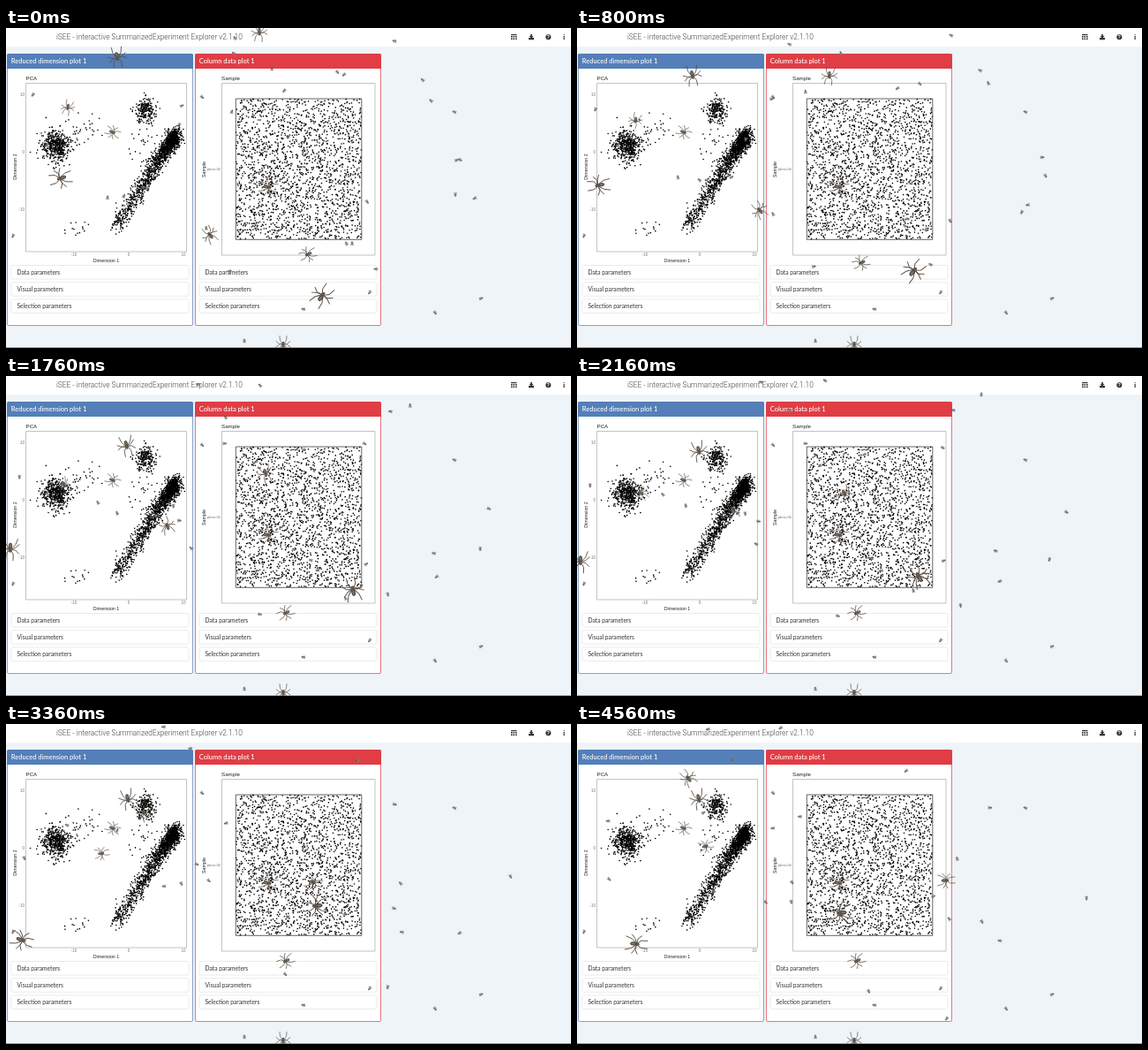
An HTML page with a canvas that plays this animation: 640x362 px, repeating every 4600 ms.

```html
<!DOCTYPE html>
<html lang="en">
<head>
<meta charset="utf-8">
<title>Bugs on a dashboard</title>
<style>
html, body { margin: 0; width: 100%; height: 100%; overflow: hidden; background: #eff4f8; }
canvas { display: block; }
</style>
</head>
<body>
<canvas id="stage" width="640" height="362"></canvas>
<script>
const LOOP = 4600, STEP = 40, WIDTH = 640, HEIGHT = 362;
const stage = document.getElementById('stage').getContext('2d');
const page = document.createElement('canvas');
page.width = WIDTH;
page.height = HEIGHT;
const bg = page.getContext('2d');

let seed = 20;
const rand = () => (seed = (seed * 16807) % 2147483647) / 2147483647;
const between = (low, high) => low + rand() * (high - low);
const gauss = () => Math.sqrt(-2 * Math.log(rand())) * Math.cos(2 * Math.PI * rand());

function box(x, y, w, h, fill, stroke, radius = 0, line = 0.7) {
  bg.beginPath();
  bg.roundRect(x, y, w, h, radius);
  if (fill) { bg.fillStyle = fill; bg.fill(); }
  if (stroke) { bg.strokeStyle = stroke; bg.lineWidth = line; bg.stroke(); }
}

function label(text, x, y, font, color, align = 'left', angle = 0) {
  bg.save();
  bg.translate(x, y);
  bg.rotate(angle);
  bg.font = font;
  bg.fillStyle = color;
  bg.textAlign = align;
  bg.fillText(text, 0, 0);
  bg.restore();
}

function dot(x, y) {
  bg.beginPath();
  bg.arc(x, y, 0.83, 0, 7);
  bg.fill();
}

function cluster(n, x, y, sx, sy) {
  for (let i = 0; i < n; i++) dot(x + gauss() * sx, y + gauss() * sy);
}

// A curved band of points, densest at its upper right end.
function strand(n) {
  for (let i = 0; i < n; i++) {
    const u = rand() ** 1.9, v = 1 - u;
    dot(191 * v * v + 344 * u * v + 124 * u * u + gauss() * 4,
        123 * v * v + 300 * u * v + 227 * u * u + gauss() * 5);
  }
}

function panel(x, title, color) {
  box(x, 30, 210, 306.5, '#fff', color, 1.5, 0.7);
  box(x - 0.5, 29, 211, 17, color, null, [1.5, 1.5, 0, 0]);
  label(title, x + 4.3, 40.2, '500 7.5px Lato, sans-serif', '#fff');
  ['Data', 'Visual', 'Selection'].forEach((name, i) => {
    const y = 268.5 + i * 19.2;
    box(x + 4.5, y, 201, 15.5, '#fff', '#e2e2e2', 1.5);
    label(name + ' parameters', x + 11, y + 10.3, '6.7px Lato, sans-serif', '#333');
  });
}

function drawIcons() {
  const ink = '#333';
  bg.fillStyle = ink;
  bg.fillRect(572, 7, 6.5, 1.2);
  for (let i = 0; i < 6; i++) bg.fillRect(572 + (i % 3) * 2.5, i < 3 ? 9 : 11.5, 1.6, 1.7);
  bg.fillRect(592, 11, 6, 2.3);
  bg.fillRect(594.2, 7, 1.7, 2.5);
  bg.beginPath();
  bg.moveTo(592.6, 9);
  bg.lineTo(597.5, 9);
  bg.lineTo(595, 11.7);
  bg.fill();
  bg.beginPath();
  bg.arc(614.3, 10.3, 3, 0, 7);
  bg.fill();
  label('?', 614.3, 12.4, 'bold 5.5px Liberation Sans, sans-serif', '#fff', 'center');
  label('i', 632, 13.4, 'bold 8px Liberation Serif, serif', ink, 'center');
}

function drawPage() {
  const sans = 'px Liberation Sans, sans-serif';
  const gray = '#777', ink = '#222', frameColor = '#aaa';
  box(0, 0, WIDTH, HEIGHT, '#eff4f8');
  box(0, 0, WIDTH, 21, '#fff');
  label('iSEE - interactive SummarizedExperiment Explorer v2.1.10', 57, 13.3, '300 8.35px Roboto, sans-serif', '#444');
  drawIcons();
  panel(1.5, 'Reduced dimension plot 1', '#547fb9');
  panel(214.5, 'Column data plot 1', '#e03d45');

  label('PCA', 22.5, 58.5, 6.2 + sans, ink);
  box(22.5, 62.5, 182, 190.5, null, frameColor);
  for (const v of [10, 0, -10]) {
    label(v, 21, 142.3 - v * 6.5, 4.6 + sans, gray, 'right');
    label(v, 139 + v * 6.2, 258, 4.6 + sans, gray, 'center');
  }
  label('Dimension 1', 113.5, 264.5, 5.3 + sans, ink, 'center');
  label('Dimension 2', 12.3, 157, 5.3 + sans, ink, 'center', -Math.PI / 2);
  bg.fillStyle = '#000';
  cluster(480, 57.5, 133, 8, 8.5);
  cluster(220, 158, 94, 6, 7);
  cluster(32, 90, 114, 12, 9);
  cluster(40, 158, 136, 10, 18);
  cluster(14, 77, 224, 11, 4);
  strand(1450);

  label('Sample', 244, 58.5, 6.2 + sans, ink);
  box(244.5, 62.5, 173.5, 194.5, null, frameColor);
  label('pbmc3k', 243, 161.3, 4.4 + sans, gray, 'right');
  label('Sample', 225.5, 160, 5.3 + sans, ink, 'center', -Math.PI / 2);
  bg.fillStyle = '#000';
  for (let i = 0; i < 2050; i++) dot(between(260.5, 402.5), between(80.5, 238.5));
  box(260.3, 80, 142.5, 159.3, null, ink);
  box(0, 361, WIDTH, 1, '#999');
}

// Smooth curve through evenly timed points; a turning point has no slope.
function curve(values, u) {
  const last = values.length - 1;
  const i = Math.min(last - 1, Math.floor(u * last)), s = u * last - i;
  const slope = k => {
    const before = values[k] - values[k - 1], after = values[k + 1] - values[k];
    if (k === 0) return after;
    if (k === last) return before;
    return before * after > 0 ? (before + after) / 2 : 0;
  };
  const rest = 1 - s, ease = s * s * (3 - 2 * s);
  return values[i] + (values[i + 1] - values[i]) * ease
    + s * rest * (rest * slope(i) - s * slope(i + 1));
}

const bugs = [];

function addSpider(size, xs, ys, duration = LOOP) {
  const at = t => {
    const u = Math.min(1, t / duration);
    return [curve(xs, u), curve(ys, u)];
  };
  bugs.push({ draw: spider, size, pose(t) {
    const end = Math.min(t + STEP, duration);
    const [x, y] = at(t), [x1, y1] = at(end), [x0, y0] = at(end - 2 * STEP < 0 ? 0 : end - 2 * STEP);
    return { x, y, angle: Math.atan2(y1 - y0, x1 - x0), moving: t < duration };
  } });
}

function restBug(draw, size, x, y, angle) {
  bugs.push({ draw, size, pose: () => ({ x, y, angle, moving: false }) });
}

// A fly walks at constant speed along an arc.
function addFly(x, y) {
  const heading = between(0, 2 * Math.PI), speed = between(20, 32);
  const turn = between(0.15, 0.6) * (rand() < 0.5 ? -1 : 1), radius = speed / turn;
  bugs.push({ draw: fly, size: 2.5, pose(t) {
    const angle = heading + turn * t / 1000;
    return {
      x: x + radius * (Math.sin(angle) - Math.sin(heading)),
      y: y - radius * (Math.cos(angle) - Math.cos(heading)),
      angle, moving: true
    };
  } });
}

function oval(x, y, rx, ry, fill, angle = 0) {
  stage.fillStyle = fill;
  stage.beginPath();
  stage.ellipse(x, y, rx, ry, angle, 0, 7);
  stage.fill();
}

function spider(r, t, moving) {
  stage.strokeStyle = '#5b5148';
  stage.lineCap = 'round';
  for (let i = 0; i < 4; i++) {
    for (const side of [-1, 1]) {
      const swing = moving ? 0.16 * Math.sin(t / 32 + i * 2.2 + side) : 0;
      const a = side * (0.4 + i * 0.75 + swing), reach = r * (i % 3 ? 0.95 : 1.15);
      const bend = a + side * (i < 2 ? 0.25 : -0.25);
      stage.lineWidth = r * 0.075;
      stage.beginPath();
      stage.moveTo(r * 0.1, side * r * 0.06);
      stage.lineTo(Math.cos(bend) * reach * 0.55, Math.sin(bend) * reach * 0.55);
      stage.lineTo(Math.cos(a) * reach, Math.sin(a) * reach);
      stage.stroke();
    }
  }
  oval(-r * 0.22, 0, r * 0.31, r * 0.18, '#514942');
  oval(-r * 0.25, 0, r * 0.2, r * 0.08, '#83776a');
  oval(r * 0.17, 0, r * 0.2, r * 0.15, '#61574d');
}

function fly(r, t, moving) {
  const spread = 0.35 + (moving ? 0.2 * Math.sin(t / 25) : 0);
  stage.globalAlpha = 0.85;
  stage.strokeStyle = '#777';
  stage.lineWidth = 0.35;
  stage.beginPath();
  for (const x of [-0.3, 0.1, 0.5]) {
    stage.moveTo(x * r, -r * 0.75);
    stage.lineTo(x * r, r * 0.75);
  }
  stage.stroke();
  oval(0, 0, r * 0.85, r * 0.36, '#666');
  for (const side of [-1, 1]) {
    oval(-r * 0.4, side * r * 0.35, r * 0.65, r * 0.27, 'rgba(135,135,135,.75)', -side * spread);
  }
  oval(r * 0.75, 0, r * 0.26, r * 0.3, '#504848');
}

function addBugs() {
  const resting = [[222, 78], [8, 235], [337, 318], [270, 354], [538, 306], [486, 322], [412, 299], [508, 95]];
  resting.forEach(([x, y], i) => restBug(fly, 2.5, x, y, i * 1.3 + 0.7));
  for (let i = 0; i < 28; i++) addFly(between(10, 580), between(10, 350));

  restBug(spider, 8, 121, 118, 0.4);
  restBug(spider, 10, 297, 180, 0.1);
  restBug(spider, 9, 314, 358, -1.57);
  addSpider(11, [126, 138], [33, 85], 2000);
  addSpider(9, [342, 317], [256, 268], 1000);
  addSpider(8, [70, 64, 100, 147], [90, 118, 147, 138]);
  addSpider(12, [62, 5, 10, 68], [170, 189, 240, 249]);
  addSpider(9.5, [231, 187, 163, 125], [234, 179, 111, 60]);
  addSpider(9.5, [287, 290, 334, 420], [5, 97, 174, 177]);
  addSpider(13, [358, 394, 362, 297], [303, 250, 205, 214]);
}

drawPage();
addBugs();
const start = performance.now();

function frame() {
  const elapsed = (performance.now() - start) % LOOP;
  const t = Math.floor(elapsed / STEP) * STEP;
  stage.drawImage(page, 0, 0);
  for (const bug of bugs) {
    const { x, y, angle, moving } = bug.pose(t);
    stage.save();
    stage.translate(x, y);
    stage.rotate(angle);
    bug.draw(bug.size, t, moving);
    stage.restore();
  }
  requestAnimationFrame(frame);
}
frame();
</script>
</body>
</html>
```
